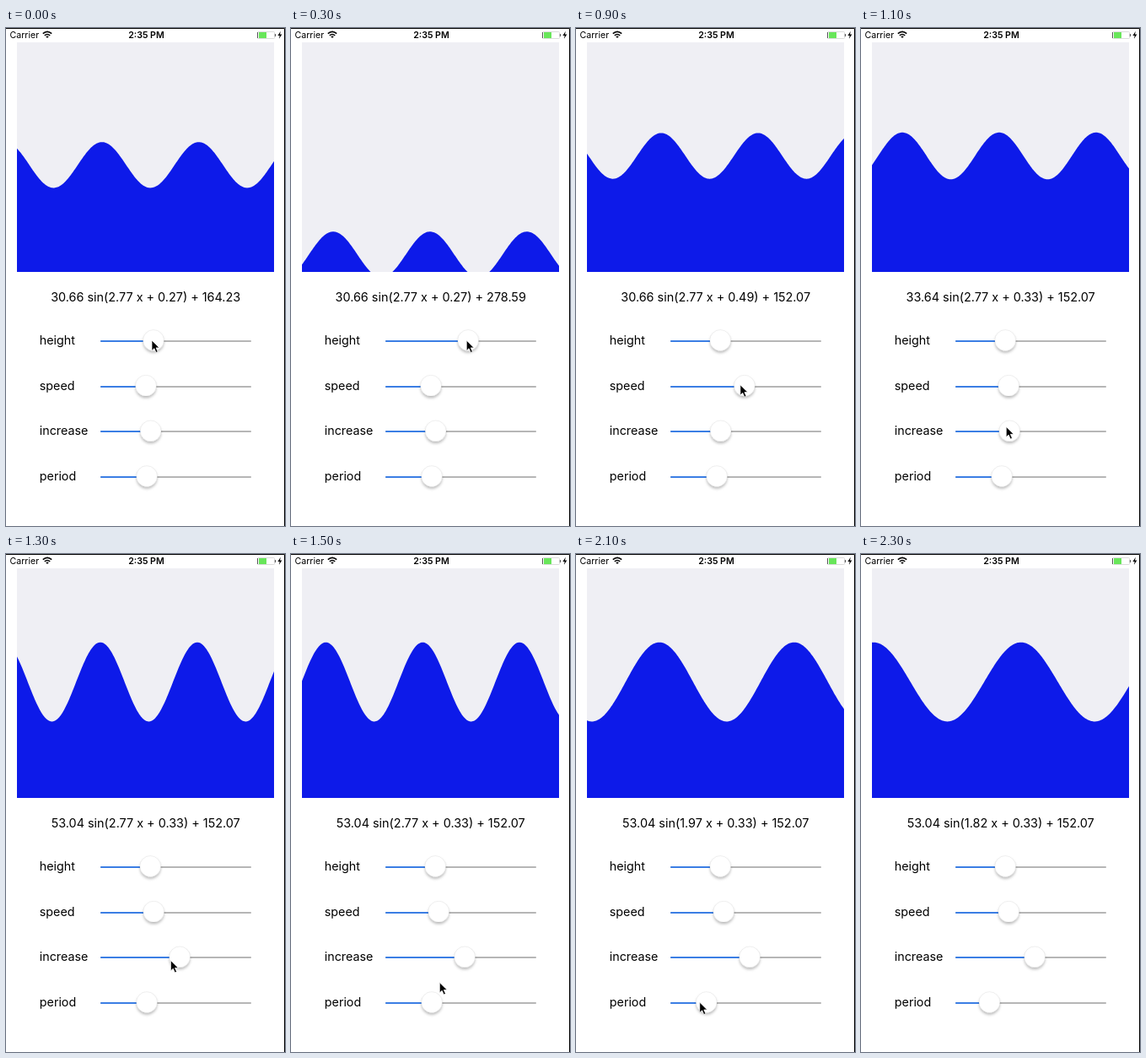
Recreate the animation shown at these times as an HTML page. Size 331 by 590 pixels, loop 2400 ms.

```html
<!DOCTYPE html>
<html lang="en">
<head>
<meta charset="utf-8">
<title>Sine wave controls</title>
<style>
  html, body { margin: 0; width: 100%; height: 100%; overflow: hidden; background: #fff; }
  svg { display: block; width: 331px; height: 590px; font: 14.3px Inter, Roboto, sans-serif; }
  .status { font-size: 10.6px; }
  #formula { font-size: 14.4px; }
</style>
</head>
<body>
<svg id="stage" viewBox="0 0 331 590">
  <defs>
    <filter id="shadow" x="-40%" y="-40%" width="180%" height="190%">
      <feDropShadow dx="0" dy="2.4" stdDeviation="1.8" flood-color="#000" flood-opacity=".25"/>
    </filter>
    <clipPath id="view"><rect x="13" y="17" width="305" height="272"/></clipPath>
  </defs>
  <rect width="331" height="590" fill="#fff"/>
  <path d="M0 .5H330.5V590" fill="none" stroke="#000"/>

  <g class="status">
    <text x="4.5" y="12">Carrier</text>
    <text x="166.5" y="12" text-anchor="middle" font-weight="600">2:35 PM</text>
  </g>
  <g fill="none" stroke="#000" stroke-width="1.6">
    <path d="M43.8 6.7Q49 2 54.2 6.7M45.8 8.9Q49 6.1 52.2 8.9"/>
    <path d="M47.2 10.1Q49 8.8 50.8 10.1L49 12Z" fill="#000" stroke="none"/>
  </g>
  <rect x="298.5" y="4.5" width="20" height="8" rx="1" fill="#fff" stroke="#ccc" stroke-width=".7"/>
  <rect x="300" y="5" width="9" height="7" fill="#68e65a"/>
  <path d="M298.5 5v7M319.5 7v3" stroke="#555"/>
  <path d="M325.8 3.8L322.4 9H324.7L323.9 12.8L327.4 7.5H325Z"/>

  <rect x="13" y="17" width="305" height="272" fill="#efeff4"/>
  <path id="wave" fill="#0d1ae9" clip-path="url(#view)"/>
  <text id="formula" x="165.7" y="324" text-anchor="middle"></text>
  <g id="sliders"></g>
  <path id="cursor" d="M0 0V12.4L2.9 9.7L5 14.5L7.2 13.5L5.1 8.9H9Z" stroke="#fff" stroke-width=".8"/>
</svg>
<script>
const LOOP = 2400, STEP = 100, LAG = 15, CURSOR_END = 2200;
const VIEW = { left: 13, right: 318, top: 17.1, bottom: 289 };
const SCALE = (VIEW.right - VIEW.left) / 345;
const $ = id => document.getElementById(id);

// One drag per slider, in order; keys are [time, value], grip is the cursor's offset on the thumb
const sliders = [
  { name: "height", max: 500, grip: [-2, 0],
    keys: [[0, 164.23], [200, 316], [300, 278.59], [485, 152.07]] },
  { name: "speed", max: 1, grip: [-5, -1], keys: [[600, .27], [900, .49], [1050, .33]] },
  { name: "increase", max: 100, grip: [-4, -5], keys: [[1080, 30.66], [1230, 53.04]] },
  { name: "period", max: 10, grip: [-8, 0], keys: [[1680, 2.77], [1800, 2.41], [2200, 1.82]] }
];
const phaseKeys = [[0, -46], [300, 154], [500, 232], [900, 714], [1300, 1040], [1800, 1593], [2300, 2066]];

const mix = (a, b, part) => a + (b - a) * part;

function valueAt(keys, time) {
  const next = keys.findIndex(key => key[0] > time);
  if (next === 0) return keys[0][1];
  if (next < 0) return keys[keys.length - 1][1];
  const [t0, a] = keys[next - 1], [t1, b] = keys[next];
  return mix(a, b, (time - t0) / (t1 - t0));
}

const thumbX = (slider, time) => 124.4 + 154 * valueAt(slider.keys, time) / slider.max;

function add(tag, attributes) {
  const node = document.createElementNS("http://www.w3.org/2000/svg", tag);
  for (const name in attributes) node.setAttribute(name, attributes[name]);
  return $("sliders").appendChild(node);
}

sliders.forEach((slider, row) => {
  const y = slider.y = 370 + 53.7 * row;
  slider.start = slider.keys[0][0];
  slider.end = slider.keys[slider.keys.length - 1][0];
  add("text", { x: 39.8, y: y + 5 }).textContent = slider.name;
  const track = { x: 112, y: Math.round(y), height: 2, rx: .9 };
  add("rect", { ...track, width: 179, fill: "#b6b6b6" });
  slider.fill = add("rect", { ...track, fill: "#3b7ee4" });
  slider.thumb = add("circle", {
    r: 12.4, cy: y, fill: "#fff", stroke: "#000", "stroke-opacity": ".13",
    "stroke-width": .5, filter: "url(#shadow)"
  });
});

function wavePath(time) {
  const [height, , amplitude, period] = sliders.map(slider => valueAt(slider.keys, time - LAG));
  const phase = valueAt(phaseKeys, time);
  let path = `M${VIEW.left} ${VIEW.bottom}`;
  for (let x = VIEW.left; x <= VIEW.right; x++) {
    const degrees = (x - VIEW.left) / SCALE * period + phase;
    const y = height + amplitude * Math.sin(degrees * Math.PI / 180);
    path += `L${x} ${(VIEW.top + y * SCALE).toFixed(2)}`;
  }
  return path + `V${VIEW.bottom}Z`;
}

// The cursor holds the dragged thumb, then glides to the next one
function cursorAt(time) {
  const hold = slider => [thumbX(slider, time) + slider.grip[0], slider.y + slider.grip[1]];
  const index = sliders.findLastIndex(slider => slider.start <= time);
  const current = sliders[index], next = sliders[index + 1];
  const from = hold(current);
  if (!next || time <= current.end) return from;
  const to = hold(next);
  const part = (time - current.end) / (next.start - current.end);
  return from.map((value, axis) => mix(value, to[axis], part));
}

function render(time) {
  for (const slider of sliders) {
    const x = thumbX(slider, time);
    slider.fill.setAttribute("width", x - 112);
    slider.thumb.setAttribute("cx", x);
  }
  const [height, speed, increase, period] =
    sliders.map(slider => valueAt(slider.keys, time).toFixed(2));
  $("formula").textContent = `${increase} sin(${period} x + ${speed}) + ${height}`;
  $("wave").setAttribute("d", wavePath(time));
  $("cursor").setAttribute("transform", `translate(${cursorAt(time)})`);
  $("cursor").setAttribute("visibility", time < CURSOR_END ? "visible" : "hidden");
}

const start = performance.now();
function tick(now) {
  const time = Math.max(0, now - start) % LOOP;
  render(Math.floor(time / STEP) * STEP);
  requestAnimationFrame(tick);
}
render(0);
requestAnimationFrame(tick);
</script>
</body>
</html>
```
